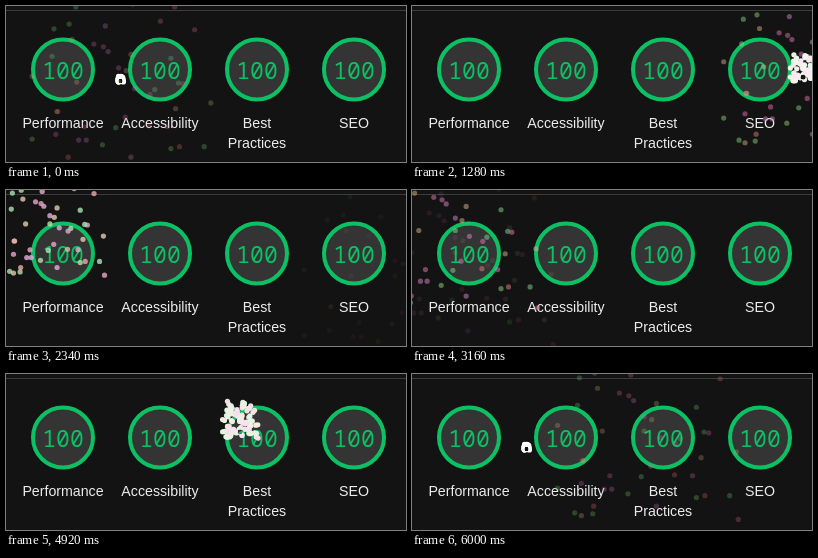
An HTML page with a canvas for the animation above (6.02 s loop, 400 px wide and 156 px high).

```html
<!DOCTYPE html>
<html lang="en">
<head>
<meta charset="utf-8">
<title>Scores with fireworks</title>
<style>
  html, body { margin: 0; width: 100%; height: 100%; overflow: hidden; background: #131313; }
  svg, canvas { position: absolute; left: 0; top: 0; width: 400px; height: 156px; }
  text { text-anchor: middle; }
  .score { font: 23px "Noto Sans Mono", "DejaVu Sans Mono", monospace; fill: #0cc164; }
  .label { font: 14.2px "Liberation Sans", Arial, sans-serif; fill: #ececec; }
  .ring { fill: #343434; stroke: #0cc164; stroke-width: 4; }
</style>
</head>
<body>
<svg viewBox="0 0 400 156"><path d="M0 4.5H400" stroke="#3c3c3c"/><g id="gauges"></g></svg>
<canvas id="sky" width="400" height="156"></canvas>
<script>
const LOOP = 6020, GRAVITY = 80, RADIUS = 2.6;

const labels = [["Performance"], ["Accessibility"], ["Best", "Practices"], ["SEO"]];
document.getElementById("gauges").innerHTML = labels.map((lines, i) => {
  const x = 57 + 97 * i;
  return `<circle class="ring" cx="${x}" cy="63.5" r="30"/>
    <text class="score" x="${x}" y="72.5">100</text>` +
    lines.map((s, n) => `<text class="label" x="${x}" y="${122 + 20 * n}">${s}</text>`).join("");
}).join("");

// Where the bursts go off, one after another
const spots = [[114.5, 75], [391, 70], [45, 51], [463, 60], [234, 56]];

// Final offset of each spark from the centre of its burst
const sparks = [
  [-70, -116], [-28, -100], [58, -32], [13, -142], [-19, 6], [-2, -75], [24, -152],
  [57, -139], [-51, -105], [62, 8], [-93, 0], [-16, -119], [53, -85], [66, -58],
  [-93, -66], [30, -14], [-2, -60], [-44, 1], [61, -59], [5, -23], [-66, -29],
  [42, -124], [-75, 26], [15, -53], [36, -52], [-38, -13], [-46, -60], [78, -115],
  [15, -157], [-36, 1], [-72, -87], [31, -47], [-68, 29], [-55, 19], [-56, 27],
  [-13, -92], [-47, -139], [-18, -97], [11, -89], [-67, -29], [53, 10], [11, 19],
  [-5, -12], [-68, -5], [95, -38], [-67, -163], [-54, -121], [49, -13], [88, 8],
  [97, 33], [6, -72]
];
const colors = [[104, 205, 125], [222, 92, 160], [205, 165, 110], [220, 105, 100], [120, 205, 95], [205, 110, 190]];

// Two sets of sparks, each with its own period and head start
const shells = [{ period: 1500, lead: 1235 }, { period: 1200, lead: 20 }];

// Cubic timing curve with control points (x1, y1) and (x2, y2)
function bezier(x1, y1, x2, y2) {
  const at = (a, b, s) => 3 * a * s * (1 - s) ** 2 + 3 * b * s * s * (1 - s) + s ** 3;
  return x => {
    let lo = 0, hi = 1;
    for (let i = 0; i < 20; i++) {
      const mid = (lo + hi) / 2;
      if (at(x1, x2, mid) < x) lo = mid; else hi = mid;
    }
    return at(y1, y2, lo);
  };
}
const easeOut = bezier(0, 0, 0.58, 1);
const easeIn = bezier(0.42, 0, 1, 1);

const ctx = document.getElementById("sky").getContext("2d");

function drawShell({ period, lead }, time) {
  const turn = (time + lead) / period;
  const [cx, cy] = spots[Math.floor(turn) % spots.length];
  const spread = easeOut(turn % 1), fall = easeIn(turn % 1);

  ctx.save();
  ctx.translate(cx, cy + GRAVITY * fall);
  ctx.globalAlpha = 1 - fall;
  // The centre itself stays empty
  ctx.beginPath();
  ctx.rect(-500, -500, 1000, 1000);
  ctx.arc(0, 0, 2.5, 0, 7);
  ctx.clip("evenodd");
  sparks.forEach(([x, y], i) => {
    const rgb = colors[i * 7 % 6].map(c => Math.round(255 + (c - 255) * spread));
    ctx.fillStyle = `rgb(${rgb})`;
    ctx.beginPath();
    ctx.arc(x * spread, y * spread, RADIUS, 0, 7);
    ctx.fill();
  });
  ctx.restore();
}

function frame() {
  const time = performance.now() % LOOP;
  ctx.clearRect(0, 0, 400, 156);
  shells.forEach(shell => drawShell(shell, time));
  requestAnimationFrame(frame);
}
frame();
</script>
</body>
</html>
```
